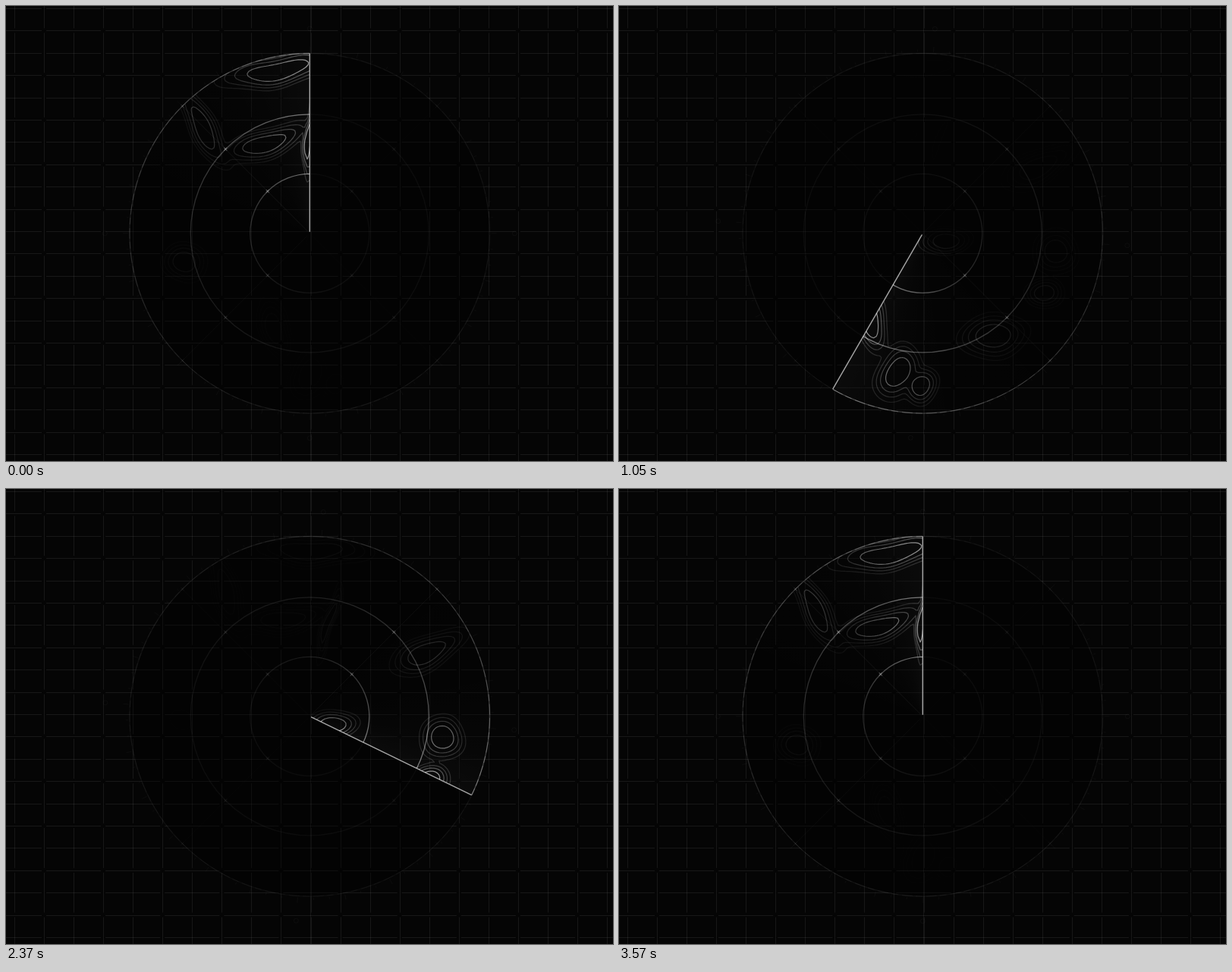
Animation of 800x600 px, one loop 3600 ms. Source, as an HTML page with a canvas:

```html
<!DOCTYPE html>
<html lang="en">
<head>
<meta charset="utf-8">
<title>Radar sweep</title>
<style>
html, body { margin: 0; width: 100%; height: 100%; overflow: hidden; background: #050505; }
canvas { display: block; width: 800px; height: 600px; }
</style>
</head>
<body>
<canvas id="stage" width="800" height="600"></canvas>
<script>
const ctx = document.getElementById('stage').getContext('2d');
const CX = 400.3, CY = 299.8, R = 237.3, STEP = 30, LOOP = 3600;
const TAU = Math.PI * 2, RAD = Math.PI / 180;

const polar = (r, deg) => [CX + r * Math.sin(deg * RAD), CY - r * Math.cos(deg * RAD)];
const spin = deg => new DOMMatrix().translate(CX, CY).rotate(deg).translate(-CX, -CY);

// Terrain peaks: bearing, range, half length, half width, tilt.
const peaks = [
  [334, 132, 30, 10, -20],
  [349, 219, 40, 11, -10],
  [0, 123, 28, 4, -85],
  [50, 177, 28, 11, -38],
  [88, 176, 15, 15, 0],
  [97, 30, 18, 9, -20],
  [106, 181, 13, 10, 0],
  [135, 165, 23, 15, -20],
  [170, 200, 13, 11, 100],
  [180, 188, 20, 14, 100],
  [200, 132, 22, 10, 70],
  [257, 168, 15, 13, 0],
  [315, 199, 32, 9, 60]
].map(([deg, range, len, wid, tilt]) => {
  const [x, y] = polar(range, deg);
  return { x, y, len, wid, cos: Math.cos(tilt * RAD), sin: Math.sin(tilt * RAD) };
});

// Height of the slightly warped terrain; each peak passes .78 at its half size.
function height(px, py) {
  const x = px + 2.5 * Math.sin(py / 13), y = py + 2.5 * Math.sin(px / 15);
  let sum = 0;
  for (const p of peaks) {
    const dx = x - p.x, dy = y - p.y;
    const u = (dx * p.cos + dy * p.sin) / p.len, v = (dy * p.cos - dx * p.sin) / p.wid;
    sum += Math.exp(-(u * u + v * v));
  }
  return Math.pow(sum, .25);
}

// Contour line by marching squares.
function contour(level) {
  const path = new Path2D(), s = 3;
  for (let x = CX - R; x < CX + R; x += s) {
    for (let y = CY - R; y < CY + R; y += s) {
      if (Math.hypot(x - CX, y - CY) > R + s) continue;
      const corners = [[x, y], [x + s, y], [x + s, y + s], [x, y + s]];
      const h = corners.map(c => height(...c) - level), cuts = [];
      corners.forEach(([ax, ay], i) => {
        const j = (i + 1) % 4, [bx, by] = corners[j];
        if (h[i] > 0 === h[j] > 0) return;
        const k = h[i] / (h[i] - h[j]);
        cuts.push([ax + (bx - ax) * k, ay + (by - ay) * k]);
      });
      for (let i = 0; i + 1 < cuts.length; i += 2) {
        path.moveTo(...cuts[i]);
        path.lineTo(...cuts[i + 1]);
      }
    }
  }
  return path;
}
const land = [.78, .61, .47, .34].map((level, i) => ({ path: contour(level), weight: 1 / (1 + i * .8) }));

// White that decays behind the sweep.
function trail(angle, peak, decay, base = 0) {
  const g = ctx.createConicGradient((angle - 90) * RAD, CX, CY);
  for (let d = 0; d <= 360; d += 15) {
    g.addColorStop(1 - d / 360, `rgba(255,255,255,${(peak * Math.exp(-d / decay) + base).toFixed(4)})`);
  }
  return g;
}

function seg(x1, y1, x2, y2) {
  ctx.beginPath();
  ctx.moveTo(x1, y1);
  ctx.lineTo(x2, y2);
  ctx.stroke();
}
function ring(x, y, r, width) {
  ctx.lineWidth = width;
  ctx.beginPath();
  ctx.arc(x, y, r, 0, TAU);
  ctx.stroke();
}

// Lines break where odd rows and columns cross.
function grid() {
  const dx = 39.05, dy = 29.4, gap = 6;
  ctx.lineWidth = 1;
  ctx.strokeStyle = 'rgba(255,255,255,.075)';
  for (let i = 0; i < 21; i++) {
    const x = Math.round(11 + i * dx) + .5, y = Math.round(3 + i * dy) + .5;
    ctx.setLineDash([2 * dy - gap, gap]);
    ctx.lineDashOffset = -(3 + dy + gap / 2);
    seg(x, 0, x, 600);
    ctx.setLineDash([2 * dx - gap, gap]);
    ctx.lineDashOffset = -(11 + dx + gap / 2);
    seg(0, y, 800, y);
  }
  ctx.setLineDash([]);
  ctx.strokeStyle = 'rgba(255,255,255,.07)';
  seg(401.5, 0, 401.5, 600);
}

function compass(turn) {
  ctx.strokeStyle = 'rgba(255,255,255,.03)';
  ctx.lineWidth = 1;
  for (let d = 0; d < 360; d += 5) {
    seg(...polar(R + 2, d + turn), ...polar(R + (d % 15 ? 5 : 9), d + turn));
  }
  for (let d = 0; d < 360; d += 90) ring(...polar(270, d + turn), 3, 1);
}

function terrain(sweep, bearing) {
  ctx.save();
  ctx.beginPath();
  ctx.arc(CX, CY, R, 0, TAU);
  ctx.clip();
  for (const fill of ['rgba(0,0,0,.36)', trail(sweep, .03, 22)]) {
    ctx.fillStyle = fill;
    ctx.fillRect(CX - R, CY - R, 2 * R, 2 * R);
  }
  ctx.lineWidth = 1.2;
  ctx.lineCap = 'round';
  for (const { path, weight } of land) {
    const turned = new Path2D();
    turned.addPath(path, spin(bearing));
    ctx.strokeStyle = trail(sweep, .58 * weight, 38);
    ctx.stroke(turned);
  }
  ctx.restore();
}

function scope(sweep) {
  const radii = [78.5, 157, R];
  ctx.lineWidth = 1;
  ctx.strokeStyle = trail(sweep, .08, 110);
  for (let d = 45; d < 360; d += 90) seg(...polar(4, d), ...polar(R, d));

  for (const r of radii) {
    const outer = r === R;
    ctx.strokeStyle = trail(sweep, outer ? .26 : .44, 65, .03);
    ring(CX, CY, r, 1.3);
    if (outer) {
      ctx.setLineDash([9, 4, 14, 5]);
      ring(CX, CY, r, 1);
      ctx.setLineDash([]);
    }
    for (let d = 45; d < 360; d += 90) {
      const [x, y] = polar(r, d);
      seg(x - 2, y - 2, x + 2, y + 2);
      seg(x + 2, y - 2, x - 2, y + 2);
    }
  }

  ctx.strokeStyle = 'rgba(255,255,255,.64)';
  ctx.lineWidth = 1.4;
  seg(...polar(2, sweep), ...polar(R, sweep));
}

function draw(t) {
  // First turn takes 60 steps, the second 59.
  const n = t / STEP;
  const sweep = n < 60 ? n * 6 : (n - 60) * 360 / 59;
  const bearing = 13.7 * Math.pow(Math.abs(Math.sin(Math.PI * t / (LOOP - STEP))), 1.3);

  ctx.fillStyle = '#050505';
  ctx.fillRect(0, 0, 800, 600);
  grid();
  compass(bearing / 3);
  terrain(sweep, bearing);
  scope(sweep);
}

const start = performance.now();
function tick() {
  const t = (performance.now() - start) % LOOP;
  draw(Math.floor(t / STEP) * STEP);
  requestAnimationFrame(tick);
}
tick();
</script>
</body>
</html>
```
